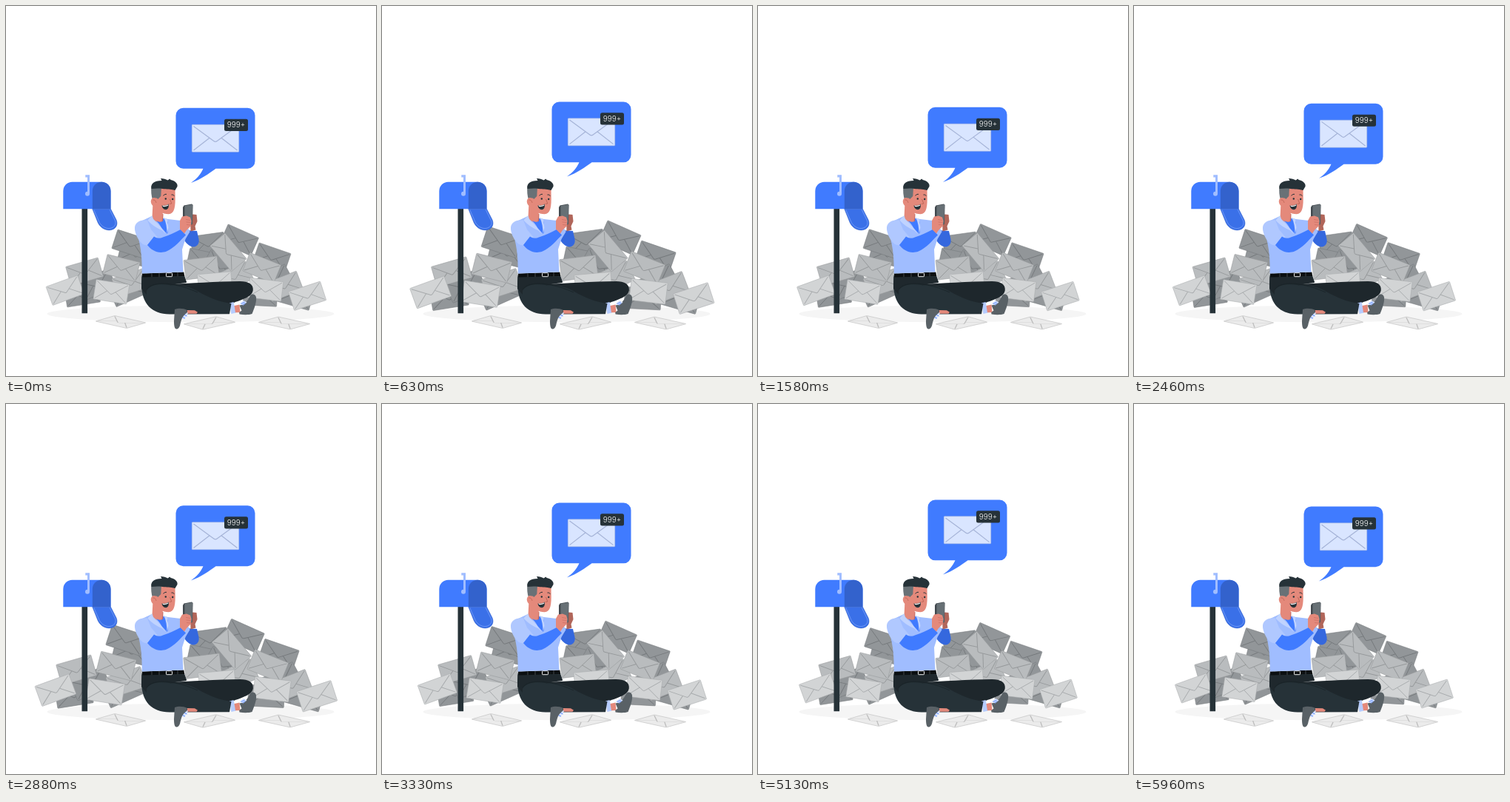
An HTML page that plays this animation: 500x500 px, repeating every 6 s.

```html
<!DOCTYPE html>
<html lang="en">
<head>
<meta charset="utf-8">
<title>Mail overload</title>
<style>
  html, body { margin: 0; width: 100%; height: 100%; overflow: hidden; background: #fff; }
  svg { display: block; width: 100%; height: 100%; }
  text { font-family: Inter, Roboto, sans-serif; font-weight: 300; }
</style>
</head>
<body>
<svg viewBox="0 0 500 500">
  <ellipse cx="249.5" cy="416" rx="194" ry="11.3" fill="#f5f5f5"/>
  <g id="pile"></g>
  <g id="floor"></g>

  <g id="mailbox">
    <path d="M102.5 273h7.6v142.3h-7.6z" fill="#263238"/>
    <path d="M77.3 274.3V250a12.2 12.2 0 0 1 12.2-12.2h39.8a12.2 12.2 0 0 1 12.2 12.2v24.3z" fill="#407bff"/>
    <path d="M116.8 274.3V250a12.35 12.2 0 0 1 24.7 0v24.3z" fill="#3362cc"/>
    <path d="M116.8 274.3h24.7l7.3 14.2c2.800 6 .5 11.800-5.500 13.800-6.300 2-15-1-19-9.300z" fill="#3a70e8" stroke="#3362cc" stroke-width=".6"/>
    <path d="M118.800 275.500l7.500 17c3.300 6 10 9.300 15.800 7.600 5.300-1.700 7.200-6 4.900-11l-6.700-13.600" fill="none" stroke="#7ea6ff" stroke-width=".7"/>
    <path d="M107.300 228.200h5.700v25.300h-3v-22h-2.700z" fill="#a0bdff"/>
    <circle cx="110" cy="253.700" r="3" fill="#a0bdff"/>
  </g>

  <g id="man">
    <path d="M243 303l15 1 2.500 11c1 6-2 10-7 10.500-5 0-9-4-12-8z" fill="#3568de"/>
    <path d="M249 284l3.500-2.500 5 .5 1 9-3 6.500 1 5-7 2z" fill="#b1665a"/>

    <!-- legs -->
    <path d="M218 376c32-1 66-4 98-4 12 0 18.500 4 17.800 12-1 9-13 12-28.800 18l-60 3z" fill="#1e272c"/>
    <path d="M302 401.500l5.500-1.500 3.300 14.500-6.300 1.500z" fill="#b6ccff"/>
    <path d="M308.500 405l7-1.500 1 10.500-6.500 .3z" fill="#e4897b"/>
    <path d="M315.500 404.500c7-1 10.500-5 14.500-13 2-3 7-2.500 8 2 .8 7-2.500 15-5.500 22.500-4 1.500-11 1.500-17 .5l-.3-2.500 3.300-2.500z" fill="#596166"/>
    <path d="M316 402l5-4 4.500 2.500-5 4z" fill="#d8e3ff"/>
    <path d="M317.500 402.500l5-2.500M319.500 404l4-2.500" stroke="#407bff" stroke-width=".8"/>
    <path d="M183.500 364h57.500l3 9c-9 1-18 2-24 5 12-3 28 1 40 8 14 8 28 14 44.500 16l-2.500 14.300-81 .2C197 416 183.500 403 183 376z" fill="#263238"/>
    <path d="M183.500 366h57.500l3 8c-9 1-16 2-22 3-14-2-28-1-32 8l0 5-7-8z" fill="#1f282d"/>
    <path d="M190 383c6-8 20-10 38-6 12 2 22 6 31 10" fill="none" stroke="#182126" stroke-width=".7"/>
    <path d="M245 411l10 .3 4 2.500-1.500 2-13 0z" fill="#e4897b"/>
    <path d="M237 421l5-7 4 .5-2 5-4 4z" fill="#d8e3ff"/>
    <path d="M238 420l4 2.300M240.500 417l4 2" stroke="#407bff" stroke-width=".8"/>
    <path d="M228 410c5-2 12-1.500 17 1l-1 4c-6 4-7 9-8.500 15-.8 4-2.500 6.500-5 6.500-3 0-3.500-5-3.500-11z" fill="#596166"/>

    <!-- torso -->
    <path d="M184 361.500l56.300-2 1 5.500-57 1.500z" fill="#0b0f11"/>
    <path d="M197 360.800v5.400M207 360.800v5.400M232 360v5.400" stroke="#45494b" stroke-width="1"/>
    <rect x="216.500" y="360.700" width="8" height="5" rx=".8" fill="none" stroke="#f0f0f0" stroke-width="1"/>
    <path d="M182 291l16-7.500 21 4.500 17 2c4 5 10 9 12.500 15l-6 10-4.500 14 1.500 30.500-55.800 2c.3-18-1-35-5.700-51z" fill="#a0bdff"/>
    <path d="M202 286l15 2 2 5-1 15-7-7z" fill="#407bff"/>
    <path d="M199.500 279l13 2-.5 12-12-5z" fill="#c56a60"/>
    <path d="M198.500 266l-1 20c4 6 9 7 13 6l1.500-14z" fill="#e4897b"/>
    <path d="M203 290c5 3 9 2 12-2l3 3 .5 16z" fill="#407bff"/>
    <path d="M197.500 283l-6 6.500c6 7 13 11 20 14l4 4.500c-4-8-11-14-16.500-20z" fill="#c0d3ff"/>
    <path d="M213 285.500l5 3 1.500 11-2 8c0-8-1-15-4.500-22z" fill="#c0d3ff"/>
    <path d="M236 290c4 1 5 6 5.500 10l4 6-4.500 7-6-6z" fill="#a0bdff"/>
    <path d="M191 289.500c-10-1-16 3-17 9.500-.7 9 8 26 17 24l15-9-10-12z" fill="#b0c8ff"/>
    <path d="M200 311.500c4 2.500 8 3 12 1 9-3 16-6 24-10.500l7 7.500c-8 8-15 17-26 22-11 4-20-1-26-8.500z" fill="#407bff"/>

    <!-- phone and hand -->
    <path d="M239 272l1.500-2.500 10.500-2 1.500 1.500-.5 26-11 2-2-2z" fill="#42494e"/>
    <path d="M241.500 270l10.700-2-.7 27-10 1.500z" fill="#677075"/>
    <path d="M235 290l3-5.500 6-1 5 2 1.500 5-1 7-5.500 5.500-3 4.500-6-6z" fill="#e4897b"/>
    <path d="M243 288.500l6 1M243.500 292l6 .5M244 295.500l5 .5" stroke="#c56a60" stroke-width=".6"/>

    <!-- head -->
    <path d="M200 246l28.500 1 .2 14c0 11-1.500 20-9 20.300-8 0-15-4.300-19-13.300z" fill="#e4897b"/>
    <path d="M196.500 243l13.500 2-.7 12-4 4c-2-2-5-2-5.500 1h-1.500c-2-5-2.500-12-1.800-19z" fill="#697176"/>
    <path d="M205.500 267c-1 4-5 5-8 2-3-4-2-9 2-10 4 0 7 4 6 8z" fill="#e4897b"/>
    <path d="M198.500 262c2.500-.5 4 1.500 4.500 4" fill="none" stroke="#b75d50" stroke-width=".7"/>
    <path d="M196.500 247c-1-7 3-11 14-11l-1.500-3c4 0 7 1 9.500 2.500l3-2 1 1.500c6 1 10 5 9 9l-3 5c-7-2-11-1-17-2-6-.7-10-.3-15 0z" fill="#263238"/>
    <circle cx="215.800" cy="260.500" r="1.200" fill="#263238"/>
    <circle cx="225.200" cy="261" r="1.200" fill="#263238"/>
    <path d="M212.500 256.300q2-2.500 4.500-2M223.500 255q2.500-.5 4 1.700" fill="none" stroke="#263238" stroke-width="1"/>
    <path d="M221.500 261l2.300 6-3 .5" fill="none" stroke="#b75d50" stroke-width=".8"/>
    <path d="M210.500 269.500c3 .6 6.500 0 9.300-2 .6 4.500-.8 7.500-3.800 7.700-3 0-5-2.500-5.500-5.700z" fill="#263238"/>
    <path d="M211.500 269.800c3 .4 5.500-.2 7.800-1.600v1.300c-2.500 1.500-5 1.900-7.300 1.600z" fill="#fff"/>
  </g>

  <g id="bubble">
    <path d="M239.500 138.400h87a10 10 0 0 1 10 10v61.900a10 10 0 0 1-10 10h-43c-9 6.300-20 14.800-33.500 19.200 8-5.500 13-11.500 16.500-19.200h-27a10 10 0 0 1-10-10v-61.900a10 10 0 0 1 10-10z" fill="#407bff"/>
    <g id="message"></g>
    <rect x="295" y="153.300" width="32" height="16.200" rx="2.500" fill="#263238"/>
    <text x="311" y="164.900" font-size="9.900" text-anchor="middle" fill="#fff">999+</text>
  </g>
</svg>
<script>
const LOOP = 6000, FLOAT = 1500, OFFSET = 40;
const byId = id => document.getElementById(id);

// Envelope outline and folds, centred on the origin
function envelope(w, h, fill, line, weight = .9) {
  const p = (x, y) => `${x * w / 2} ${y * h / 2}`;
  return `<rect x="${-w / 2}" y="${-h / 2}" width="${w}" height="${h}" rx=".8" fill="${fill}" stroke="${line}" stroke-width=".5"/>
    <path d="M${p(-.93, -.88)}L${p(-.07, .2)}Q${p(0, .3)} ${p(.07, .2)}L${p(.93, -.88)}M${p(-.93, .88)}L${p(-.25, -.03)}M${p(.93, .88)}L${p(.25, -.03)}"
      fill="none" stroke="${line}" stroke-width="${weight}"/>`;
}

const dark = ["#929699", "#75797c"];
const mid = ["#b9bcbe", "#96999b"];
const light = ["#d2d4d5", "#a8abad"];

// x, y, angle, tone; listed back to front
const letters = [
  [176, 336, 14, dark], [169, 322, 18, dark], [104, 390, -9, dark],
  [124, 376, -24, dark], [315, 316.5, 24, dark], [273, 322, -8, dark],
  [358.5, 340, 19, dark], [362, 371, -28, dark], [268, 345, 12, dark],
  [343, 391.5, 3, dark], [390, 392, 16, dark], [290, 352, 30, dark],
  [165, 385, -24, dark],
  [375, 378.5, -21, mid], [169, 374, -18, mid], [308, 366, -25, mid],
  [300, 333, 50, mid], [264, 354, -7, mid], [345, 354, 22, mid],
  [107, 359, -16, mid], [156.5, 354, 14, mid],
  [282, 374, -5, light], [350, 383, 7, light],
  [81, 384, -20, light], [143, 386, 9, light], [406, 391.5, -18, light]
];
byId("pile").innerHTML = letters.map(([x, y, a, tone]) =>
  `<g transform="translate(${x} ${y}) rotate(${a})">${envelope(45, 26.5, ...tone)}</g>`).join("");

// Letters lying on the ground: centre, then width and height vectors
const flat = [
  [155, 427, 42, 9.5, -26, 7.5],
  [275, 428.5, 44, -10, 26, 7.5],
  [376, 428.5, 43, 9.5, -27, 7.5]
];
byId("floor").innerHTML = flat.map(([x, y, ax, ay, bx, by]) =>
  `<g transform="matrix(${ax / 40} ${ay / 40} ${bx / 24} ${by / 24} ${x} ${y})">${envelope(40, 24, "#ebebeb", "#bdbdbd")}</g>`).join("");

byId("message").innerHTML =
  `<g transform="translate(283 179.3)">${envelope(63.5, 37, "#d9e5ff", "#a6b4d8", 1.2)}</g>`;

// Linear interpolation through [position, value] stops
function track(stops, u) {
  const i = stops.findIndex(s => s[0] >= u);
  if (i < 1) return stops[0][1];
  const [a, va] = stops[i - 1], [b, vb] = stops[i];
  return va + (vb - va) * (u - a) / (b - a);
}

const beat = [[0, 1], [.1, 1.1], [.3, 1], [.4, 1], [.5, 1.1], [.6, 1], [1, 1]];
const hover = [[0, 0], [.5, -10], [1, 0]];
const pile = byId("pile"), bubble = byId("bubble");

function render(ms) {
  const t = (ms + OFFSET) % LOOP;
  const s = track(beat, t / LOOP);
  pile.setAttribute("transform", `translate(244 353) scale(${s}) translate(-244 -353)`);
  bubble.setAttribute("transform", `translate(0 ${track(hover, t % FLOAT / FLOAT)})`);
}

const start = performance.now();
function tick() {
  render(performance.now() - start);
  requestAnimationFrame(tick);
}
tick();
</script>
</body>
</html>
```
